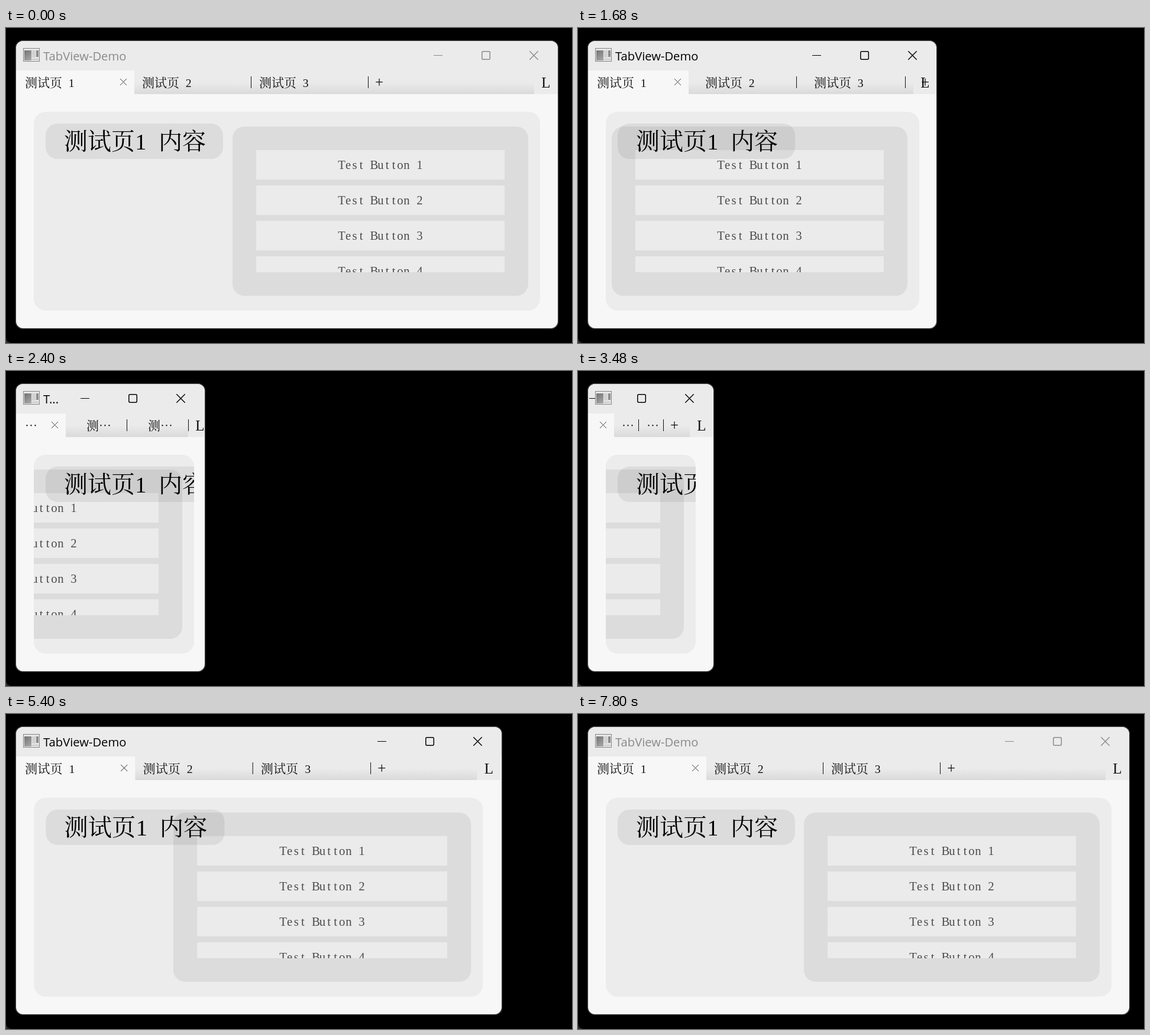
Write an HTML page with a canvas that moves like this. It is 957x534 px and loops after 7920 ms.

```html
<!DOCTYPE html>
<html lang="zh-CN">
<head>
<meta charset="utf-8">
<title>TabView-Demo</title>
<style>
  html, body { margin: 0; width: 100%; height: 100%; overflow: hidden; background: #000; }
  canvas { display: block; width: 957px; height: 534px; }
</style>
</head>
<body>
<canvas id="stage" width="957" height="534"></canvas>
<script>
const ctx = document.getElementById('stage').getContext('2d');
const LOOP = 7920, STEP = 60, LEFT = 17;
const SERIF = '"Liberation Serif", "Noto Serif", serif';
const CJK = '"Noto Serif CJK SC", "Noto Sans CJK SC", "Noto Sans CJK", serif';
const SHADE = 'rgba(0,0,0,.068)';

// [time in ms, right edge of the window]
const keys = [
  [780, 933], [1470, 653], [1620, 620], [1650, 607], [1680, 606], [2190, 415],
  [2370, 348], [2400, 336], [2460, 323], [3300, 229], [4200, 229], [4470, 356],
  [4650, 557], [4680, 577], [5040, 747], [5880, 911], [6240, 927], [6360, 927],
  [6480, 930], [6720, 930], [6780, 931], [6840, 932]
];
const slopes = keys.slice(1).map((k, i) => (k[1] - keys[i][1]) / (k[0] - keys[i][0]));
const tangents = keys.map((_, i) => {
  const a = slopes[i - 1] || 0, b = slopes[i] || 0;
  return a * b > 0 ? 2 * a * b / (a + b) : 0;
});

// Monotone cubic interpolation of the right edge.
function edge(t) {
  const last = keys.length - 1;
  if (t <= keys[0][0]) return keys[0][1];
  if (t >= keys[last][0]) return keys[last][1];
  const i = keys.findIndex(k => k[0] > t) - 1;
  const [t0, a] = keys[i], [t1, b] = keys[i + 1];
  const h = t1 - t0, u = (t - t0) / h, v = 1 - u;
  return a * (1 + 2 * u) * v * v + b * u * u * (3 - 2 * u)
    + h * u * v * (tangents[i] * v - tangents[i + 1] * u);
}

function rect(x, y, w, h, color) {
  ctx.fillStyle = color;
  ctx.fillRect(x, y, w, h);
}

function round(x, y, w, h, r, color) {
  ctx.beginPath();
  ctx.roundRect(x, y, w, h, r);
  ctx.fillStyle = color;
  ctx.fill();
}

function cross(x, y, r, color, width) {
  ctx.strokeStyle = color;
  ctx.lineWidth = width;
  ctx.beginPath();
  ctx.moveTo(x - r, y - r);
  ctx.lineTo(x + r, y + r);
  ctx.moveTo(x + r, y - r);
  ctx.lineTo(x - r, y + r);
  ctx.stroke();
}

function clipped(x, y, w, h, draw) {
  ctx.save();
  ctx.beginPath();
  ctx.rect(x, y, w, h);
  ctx.clip();
  draw();
  ctx.restore();
}

const isWide = c => c > '\u2000';
const cellWidth = (text, size) => [...text].reduce((s, c) => s + (isWide(c) ? size : size / 2), 0);

// Fixed-pitch text: full cells for Chinese, half cells for Latin.
function cells(text, x, y, size, color) {
  ctx.fillStyle = color;
  ctx.textAlign = 'center';
  for (const c of text) {
    const w = cellWidth(c, size);
    const weight = c === '⋯' ? 900 : 300;
    ctx.font = isWide(c) ? `${weight} ${size}px ${CJK}` : `${size * .94}px ${SERIF}`;
    ctx.fillText(c, x + w / 2, y);
    x += w;
  }
}

function glyph(c, x, y, size) {
  ctx.fillStyle = '#111';
  ctx.textAlign = 'center';
  ctx.font = `${size}px ${SERIF}`;
  ctx.fillText(c, x, y);
}

function shorten(text, room, dots, measure) {
  if (measure(text) <= room) return text;
  let n = text.length - 1;
  while (n > 0 && measure(text.slice(0, n) + dots) > room) n--;
  return text.slice(0, n) + dots;
}

function label(text, x, room) {
  if (room <= 0) return;
  cells(shorten(text, room, '⋯', s => cellWidth(s, 21)), x, 100, 21, '#111');
}

function icon() {
  rect(29, 34, 28, 23, '#858585');
  rect(30, 35, 26, 21, '#e6e6e6');
  const g = ctx.createLinearGradient(31, 38, 43, 55);
  g.addColorStop(0, '#747474');
  g.addColorStop(1, '#a9a9a9');
  rect(31, 38, 12, 17, g);
  rect(44, 38, 6, 12, '#d2d2d2');
  rect(51, 38, 4, 11, '#8c8c8c');
  rect(44, 52, 11, 2, '#cacaca');
}

function titleBar(r, active) {
  const ink = active ? '#000' : '#8a8a8a';
  rect(LEFT, 22, r - LEFT, 50, '#ebebeb');
  rect(r - 210, 46, 15, 1, ink);
  ctx.strokeStyle = ink;
  ctx.lineWidth = 1.5;
  ctx.beginPath();
  ctx.roundRect(r - 128.2, 39.8, 13.5, 13.5, 2);
  ctx.stroke();
  cross(r - 40.5, 46.5, 7.2, ink, 1.4);
  icon();
  ctx.font = '20.2px "Open Sans", "Noto Sans", sans-serif';
  ctx.textAlign = 'left';
  ctx.fillStyle = ink;
  const room = r - 306;
  const text = shorten('TabView-Demo', room, '...', s => ctx.measureText(s).width);
  if (ctx.measureText(text).width <= room && text !== '...') ctx.fillText(text, 63, 54.5);
}

const tabWidth = r => Math.min(200, (r - 97) / 3);

// Tab widths follow the layout at once; tab positions trail behind.
function tabs(r, late) {
  const w = tabWidth(r), lateW = tabWidth(late);
  const start = i => Math.round(LEFT + i * lateW - 2 * (i - 1));
  const selected = Math.round(w);
  const bar = ctx.createLinearGradient(0, 92, 0, 112);
  bar.addColorStop(0, '#ebebeb');
  bar.addColorStop(1, '#dadada');
  rect(LEFT, 72, r - LEFT, 40, '#ebebeb');
  rect(LEFT, 92, r - 40 - LEFT, 20, bar);
  glyph('L', r - 20, 101, 25);
  for (const i of [1, 2]) {
    const x = start(i);
    label('测试页 ' + (i + 1), x + 13, w - 28);
    rect(x + Math.round(w) - 3, 82, 1, 20, '#111');
  }
  glyph('+', start(3) + 18, 100, 25);
  rect(LEFT, 72, selected, 40, '#f7f7f7');
  label('测试页 1', LEFT + 15, w - 50);
  cross(LEFT + selected - 18.5, 91.5, 5.5, '#444', 1);
}

function page(r) {
  const width = r - 30 - 47, box = r - 550;
  round(47, 142, width, 337, 20, '#ececec');
  clipped(47, 142, width, 337, () => {
    round(box, 167, 500, 287, 20, SHADE);
    clipped(box + 40, 207, 420, 207, () => {
      for (let i = 0; i < 4; i++) {
        const y = 207 + 60 * i;
        rect(box + 40, y, 420, 50, '#ebebeb');
        cells('Test Button ' + (i + 1), box + 179, y + 32, 22, '#4c4c4c');
      }
    });
    round(67, 162, 300, 60, 20, SHADE);
    cells('测试页1 内容', 98, 206, 40, '#000');
  });
}

function draw(t) {
  const r = Math.round(edge(t));
  const laid = Math.round(edge(t - 30));
  const late = edge(t - 210);
  rect(0, 0, 957, 534, '#000');

  ctx.beginPath();
  ctx.moveTo(0, 525);
  ctx.quadraticCurveTo(1, 533, 9, 534);
  ctx.lineTo(0, 534);
  ctx.fillStyle = '#2c2c2c';
  ctx.fill();

  round(LEFT - 1.5, 20.5, r - LEFT + 3, 490, 13, '#333');
  ctx.save();
  ctx.beginPath();
  ctx.roundRect(LEFT, 22, r - LEFT, 487, 12);
  ctx.clip();
  rect(LEFT, 22, r - LEFT, 487, '#f7f7f7');
  titleBar(r, t >= 660 && t < 7800);

  // While growing, the older layout is stretched toward the new edge.
  const grow = Math.max(0, r - laid) * .8;
  ctx.translate(LEFT, 0);
  ctx.scale(1 + grow / (laid - LEFT), 1);
  ctx.translate(-LEFT, 0);
  tabs(laid, late);
  page(laid);
  ctx.restore();
}

function tick() {
  const t = performance.now() % LOOP;
  draw(Math.floor(t / STEP) * STEP);
  requestAnimationFrame(tick);
}
tick();
</script>
</body>
</html>
```
